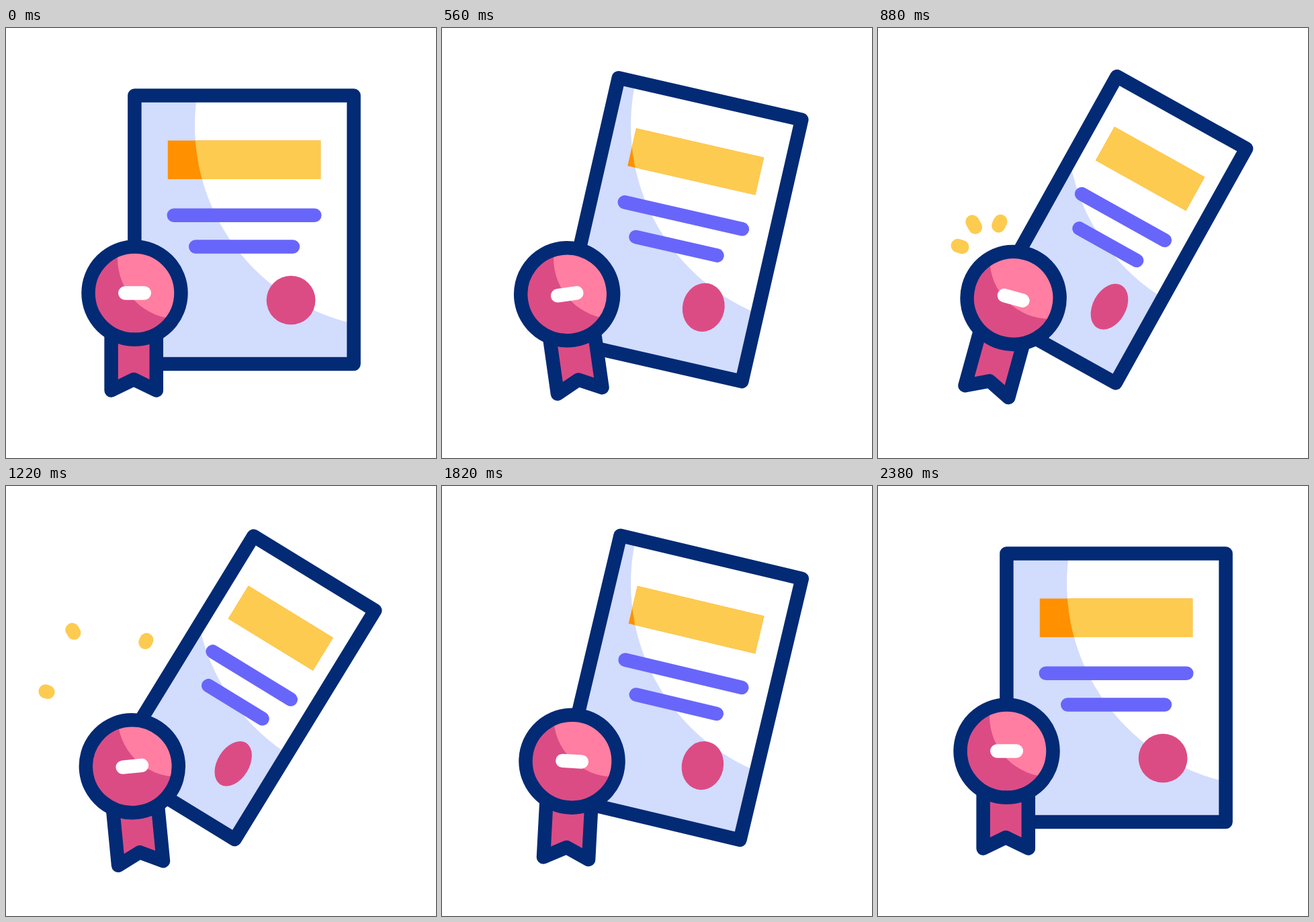
An HTML page that plays this animation: 640x640 px, repeating every 2400 ms.

```html
<!DOCTYPE html>
<html lang="en">
<head>
<meta charset="utf-8">
<title>Certificate</title>
<style>
  html, body { margin: 0; width: 100%; height: 100%; overflow: hidden; background: #fff; }
  svg { display: block; width: 100%; height: 100%; }
  .line { fill: none; stroke-width: 20.5; stroke-linecap: round; stroke-linejoin: round; }
  .navy { stroke: #032a75; }
  .violet { stroke: #6866fa; }
  .gold { stroke: #fdcb50; }
  .white { stroke: #fff; }
  .pink { fill: #db4c85; }
</style>
</head>
<body>
<svg viewBox="0 0 640 640">
  <defs>
    <clipPath id="sheetClip"><path id="sheetCut"/></clipPath>
    <clipPath id="bannerClip"><path id="bannerCut"/></clipPath>
    <clipPath id="sealClip"><circle id="sealCut" r="69"/></clipPath>
  </defs>

  <path id="sparks" class="line gold"/>

  <path id="sheet" fill="#d2dcfd"/>
  <g clip-path="url(#sheetClip)"><circle cx="583.3" cy="145" r="302.3" fill="#fff"/></g>
  <path id="banner" fill="#ff9000"/>
  <g clip-path="url(#bannerClip)"><circle cx="583.3" cy="145" r="302.3" fill="#fdcb50"/></g>
  <path id="rows" class="line violet"/>
  <ellipse id="stamp" class="pink" ry="36.4"/>
  <path id="frame" class="line navy"/>

  <g id="ribbon">
    <path class="line navy pink" style="fill:#db4c85;stroke-linecap:butt"
      d="M156.6 450V539.4L190.2 523L223.8 539.4V450"/>
  </g>
  <circle id="disc" class="pink" r="69"/>
  <g clip-path="url(#sealClip)"><circle cx="256" cy="343" r="90" fill="#ff7ea1"/></g>
  <g id="medal">
    <circle class="line navy" cx="191.5" cy="394.6" r="69"/>
    <path class="line white" d="M177.3 394.6H205.8"/>
  </g>
</svg>
<script>
const LOOP = 2400;
const CX = 354.5, CY = 300.2;
const PX = 191.5, PY = 432.5, ARM = 37.9;

const $ = id => document.getElementById(id);
const set = (id, attrs) => {
  for (const k in attrs) $(id).setAttribute(k, attrs[k]);
};
const clamp = x => Math.min(1, Math.max(0, x));
const smooth = x => x * x * (3 - 2 * x);
const cubic = x => {
  x = clamp(x);
  return x < 0.5 ? 4 * x ** 3 : 1 - 4 * (1 - x) ** 3;
};

// [time, value] pairs, eased in and out between neighbours
function track(keys, t) {
  for (let i = 1; i < keys.length; i++) {
    const [t0, a] = keys[i - 1], [t1, b] = keys[i];
    if (t < t1) return a + (b - a) * smooth((t - t0) / (t1 - t0));
  }
  return keys[keys.length - 1][1];
}

const BOUNCE = [[0, 0], [360, 53.5], [720, -36], [1060, 56], [1410, -21], [1815, 15], [2160, 0]];
const SWING = [[0, 0], [410, -19], [820, 17], [1190, -5.6], [1850, 3.1], [2160, 0]];
// start x, y and travel x, y
const SPARKS = [[169.1, 339.5, -70.5, -125.4], [163.8, 328.2, 45.4, -99.2], [160, 336.7, -101.3, -31.1]];

function drawSheet(t) {
  const p = t < 1194 ? cubic(t / 1198) : 1 - cubic((t - 1188) / 1200);
  const a = p * 31.5 * Math.PI / 180, s = 1 - 0.35 * p;
  const c = Math.cos(a), n = Math.sin(a);
  const at = (x, y) => {
    const u = (x - CX) * s, v = y - CY;
    return [CX + u * c - v * n, CY + u * n + v * c];
  };
  const box = (l, u, r, b) => `M${at(l, u)}L${at(r, u)}L${at(r, b)}L${at(l, b)}Z`;

  const sheet = box(191.4, 100.4, 517.6, 500);
  const banner = box(240.8, 167.6, 468.3, 225);
  for (const id of ["sheet", "sheetCut", "frame"]) set(id, { d: sheet });
  for (const id of ["banner", "bannerCut"]) set(id, { d: banner });
  set("rows", { d: `M${at(249.8, 278.8)}L${at(459.3, 278.8)}M${at(282.2, 325.4)}L${at(427, 325.4)}` });

  const [x, y] = at(424.1, 405.2);
  set("stamp", { cx: x, cy: y, rx: 36.4 * s, transform: `rotate(${p * 31.5} ${x} ${y})` });
}

function drawSeal(t) {
  const dy = track(BOUNCE, t), deg = track(SWING, t), a = deg * Math.PI / 180;
  const pose = `translate(0 ${dy}) rotate(${deg} ${PX} ${PY})`;
  set("ribbon", { transform: pose });
  set("medal", { transform: pose });
  const centre = { cx: PX + ARM * Math.sin(a), cy: PY - ARM * Math.cos(a) + dy };
  set("disc", centre);
  set("sealCut", centre);
}

function drawSparks(t) {
  let d = "";
  if (t > 640 && t < 1300) {
    const head = cubic((t - 600) / 600);
    const size = 0.063 * Math.sqrt(1 - clamp((t - 850) / 450) ** 2);
    const tail = Math.max(0, head - size);
    for (const [x, y, dx, dy] of SPARKS) {
      d += `M${x + dx * tail} ${y + dy * tail}L${x + dx * head} ${y + dy * head}`;
    }
  }
  set("sparks", { d });
}

function draw(t) {
  drawSheet(t);
  drawSeal(t);
  drawSparks(t);
}

let start;
function tick(now) {
  if (start === undefined) start = now;
  draw((now - start) % LOOP);
  requestAnimationFrame(tick);
}
draw(0);
requestAnimationFrame(tick);
</script>
</body>
</html>
```
